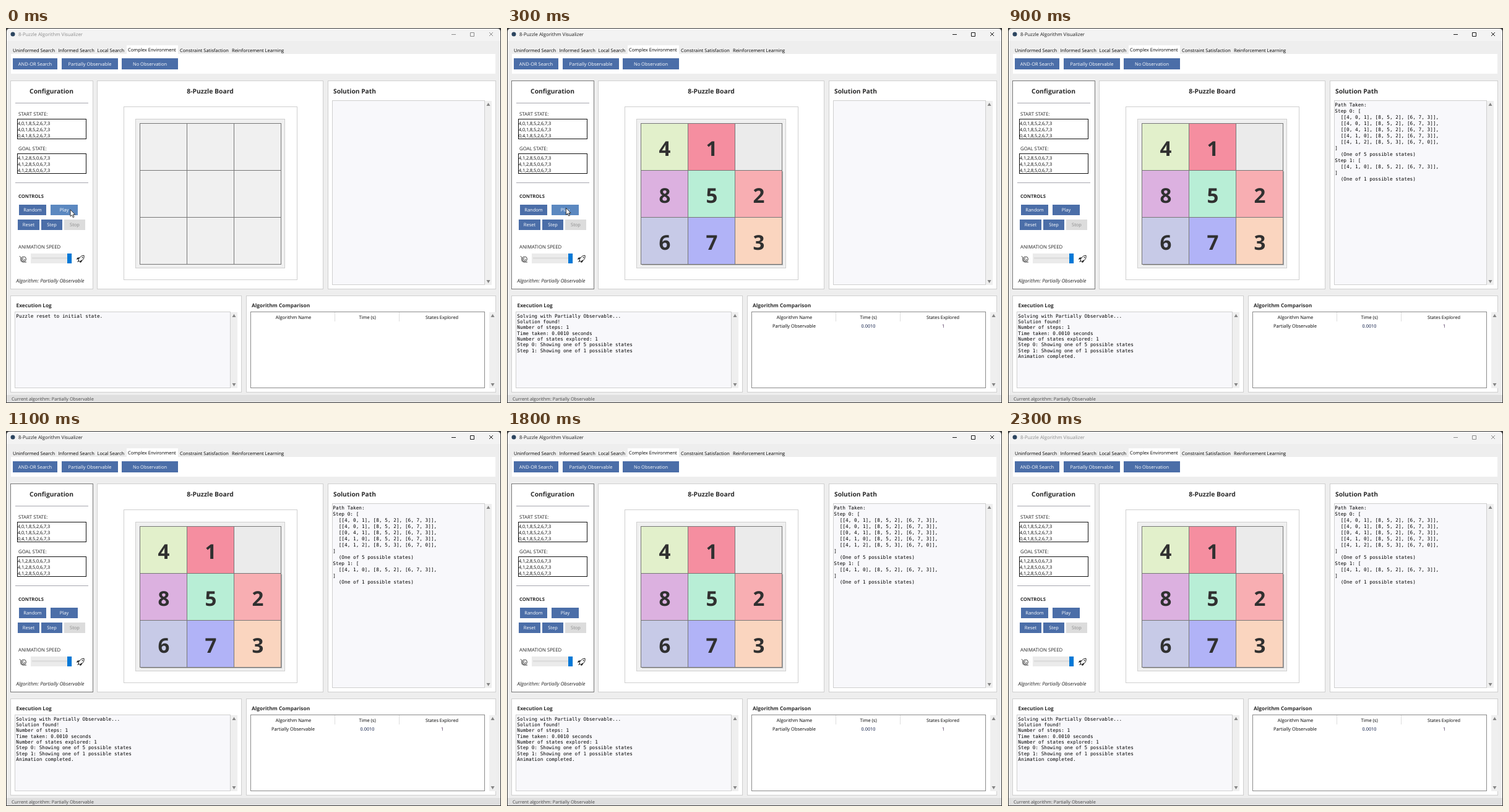
An HTML page with a canvas that plays this animation: 800x607 px, repeating every 2400 ms.

```html
<!DOCTYPE html>
<html lang="en">
<head>
<meta charset="utf-8">
<title>8-Puzzle Algorithm Visualizer</title>
<style>
html, body { margin: 0; width: 100%; height: 100%; overflow: hidden; background: #fff; }
canvas { display: block; }
</style>
</head>
<body>
<canvas id="stage" width="800" height="607"></canvas>
<script>
const c = document.getElementById('stage').getContext('2d');
c.textRendering = 'geometricPrecision';
const LOOP = 2400, BLUE = '#4b6ea8', HOVER = '#5b88c0', EDGE = '#cfcfcf', PAPER = '#f8f8fb';
const SANS = '"Open Sans", sans-serif', MONO = '"DejaVu Sans Mono", monospace';
const TILES = ['#ebebeb', '#f58ea0', '#f8aeb2', '#fad5bf', '#e2f0cb', '#b8eed6', '#c7cae7', '#b1b3f7', '#dcb1e0'];
const LOG = [
  'Solving with Partially Observable...',
  'Solution found!',
  'Number of steps: 1',
  'Time taken: 0.0010 seconds',
  'Number of states explored: 1',
  'Step 0: Showing one of 5 possible states',
  'Step 1: Showing one of 1 possible states',
  'Animation completed.'
];
const PATH = [
  'Path Taken:',
  'Step 0: [',
  '  [[4, 0, 1], [8, 5, 2], [6, 7, 3]],',
  '  [[4, 0, 1], [8, 5, 2], [6, 7, 3]],',
  '  [[0, 4, 1], [8, 5, 2], [6, 7, 3]],',
  '  [[4, 1, 0], [8, 5, 2], [6, 7, 3]],',
  '  [[4, 1, 2], [8, 5, 3], [6, 7, 0]],',
  ']',
  '  (One of 5 possible states)',
  'Step 1: [',
  '  [[4, 1, 0], [8, 5, 2], [6, 7, 3]],',
  ']',
  '  (One of 1 possible states)'
];

function fill(x, y, x2, y2, color) {
  c.fillStyle = color;
  c.fillRect(x, y, x2 - x, y2 - y);
}

// Filled box with a one-pixel border inside its corners
function box(x, y, x2, y2, color, edge) {
  fill(x, y, x2, y2, color);
  c.lineWidth = 1;
  c.strokeStyle = edge;
  c.strokeRect(x + .5, y + .5, x2 - x - 1, y2 - y - 1);
}

// y is the middle of the capitals
function text(s, x, y, size, { color = '#111', style = '', align = 'left', font = SANS } = {}) {
  c.font = `${style} ${size}px ${font}`;
  c.textAlign = align;
  c.fillStyle = color;
  c.fillText(s, x, y + size * .36);
}

const bold = (s, x, y, size, align) => text(s, x, y, size, { style: 'bold', align, color: '#2b2b2b' });
const mid = (s, x, y, size = 7.5, color = '#000') => text(s, x, y, size, { align: 'center', color });
const lines = (list, x, y, step, size, font) =>
  list.forEach((s, i) => text(s, x, y + i * step, size, { font, color: '#000' }));

function button(s, x, y, x2, y2, color = BLUE, ink = '#fff') {
  fill(x, y, x2, y2, color);
  mid(s, (x + x2) / 2, (y + y2) / 2, 7.5, ink);
}

function shape(d, color, edge, width = 1) {
  const p = new Path2D(d);
  if (color) { c.fillStyle = color; c.fill(p); }
  if (edge) { c.strokeStyle = edge; c.lineWidth = width; c.stroke(p); }
}

function scrollbar(x, y, y2) {
  fill(x, y, x + 11, y2, '#efefef');
  shape(`M${x + 2.5} ${y + 8}h6l-3-5z M${x + 2.5} ${y2 - 8}h6l-3 5z`, '#858585');
}

function titleBar(active) {
  const ink = active ? '#1a1a1a' : '#8c8c8c';
  fill(0, 0, 800, 21, '#f3f3f3');
  c.beginPath();
  c.arc(11, 10, 3.5, 0, 7);
  c.fillStyle = '#2c4560';
  c.fill();
  text('8-Puzzle Algorithm Visualizer', 20, 10.5, 7.75, { color: ink });
  shape('M720 10.5h7 M750.5 7.5h6v6h-6z M781 7l6 6m0-6l-6 6', null, ink, 1);
}

function tabs() {
  fill(8, 42, 791, 74, '#fff');
  fill(195, 28, 278, 43, '#fff');
  [['Uninformed Search', 11], ['Informed Search', 84.5], ['Local Search', 147.5], ['Complex Environment', 197],
   ['Constraint Satisfaction', 281], ['Reinforcement Learning', 365]]
    .forEach(([s, x], i) => text(s, x, i == 3 ? 35.5 : 36.5, 7.52, { color: '#000' }));
  button('AND-OR Search', 11, 49, 83, 67);
  button('Partially Observable', 90, 49, 181, 67);
  button('No Observation', 187, 49, 278, 67);
}

function config(active, hover) {
  box(7, 85, 141, 423, '#fff', active ? '#777' : EDGE);
  bold('Configuration', 73.5, 102.5, 10.3, 'center');
  fill(15, 121, 133, 122, '#a6a6ae');
  fill(15, 250, 133, 251, '#a6a6ae');
  text('START STATE:', 20, 139, 7.8, { color: '#222' });
  text('GOAL STATE:', 20, 195, 7.8, { color: '#222' });
  box(18, 147, 130, 180, '#fff', '#111');
  box(18, 203, 130, 236, '#fff', '#111');
  lines(['4,0,1,8,5,2,6,7,3', '4,0,1,8,5,2,6,7,3', '0,4,1,8,5,2,6,7,3'], 19, 154, 10, 7.35, SANS);
  lines(Array(3).fill('4,1,2,8,5,0,6,7,3'), 19, 210, 10, 7.35, SANS);
  bold('CONTROLS', 20, 272, 7.6);
  button('Random', 21, 286, 65, 303);
  button('Play', 72, 286, 116, 303, hover ? HOVER : BLUE);
  button('Reset', 19, 310, 54, 327);
  button('Step', 57, 310, 91, 327);
  button('Stop', 94, 310, 128, 327, '#dcdcdc', '#8c8c8c');
  text('ANIMATION SPEED', 20, 354, 7.8, { color: '#222' });
  fill(40, 365, 107, 381, '#ebebeb');
  fill(42, 371, 105, 374, '#dedede');
  fill(99, 365, 106, 381, '#0078d7');
  // Snail and rocket
  shape('M22 369l2 3v5q1 2 4 2h5M32.5 374a4 4 0 1 1-8 0a4 4 0 1 1 8 0M30.5 374a2 2 0 1 1-2-2', null, '#333', .9);
  shape('M126 368q-5 0-8 5l-1 3 2 2 3-1q5-3 4-9z', '#fff', '#222');
  shape('M119 371l-4 1-1 3 3-1zM123 375l-1 4-3 1 1-3zM117 376l-2 3 3-1zM123.5 370.5a1 1 0 1 1-1 1z', '#222');
  text('Algorithm: Partially Observable', 16.5, 409, 8.05, { style: 'italic', color: '#222' });
}

function board(cells) {
  box(147, 85, 513, 423, '#fff', EDGE);
  bold('8-Puzzle Board', 330, 102.5, 10.4, 'center');
  box(190, 127, 471, 408, '#fff', EDGE);
  box(209, 147, 451, 389, '#f0f0f0', EDGE);
  for (let i = 0; i < 9; i++) {
    const x = 216 + i % 3 * 76, y = 154 + Math.floor(i / 3) * 76, n = cells ? +cells[i] : 0;
    if (n) fill(x + 2, y + 2, x + 78, y + 78, '#aaa');
    box(x, y, x + 77, y + 77, cells ? TILES[n] : '#f0f0f0', '#777');
    if (n) text(n, x + 39, y + 41, 33, { style: 'bold', align: 'center', color: '#303030' });
  }
}

function results(solved, logLines, pathLines) {
  box(520, 85, 792, 423, '#fff', EDGE);
  bold('Solution Path', 529, 102.5, 10.25);
  box(527, 117, 774, 416, PAPER, EDGE);
  scrollbar(774, 118, 416);
  lines(pathLines, 528.3, 124, 10, 7.75, MONO);

  box(7, 433, 381, 590, '#fff', EDGE);
  bold('Execution Log', 16.5, 449, 8.3);
  box(14, 459, 363, 583, PAPER, EDGE);
  scrollbar(363, 460, 583);
  lines(logLines, 16.3, 466, 9.33, 7.75, MONO);

  box(388, 433, 792, 590, '#fff', EDGE);
  bold('Algorithm Comparison', 397, 449, 8.35);
  box(395, 459, 774, 583, '#fff', '#8a8a8a');
  scrollbar(781, 460, 583);
  fill(531, 460, 532, 475, '#dedede');
  fill(635, 460, 636, 475, '#dedede');
  mid('Algorithm Name', 464.5, 468);
  mid('Time (s)', 584, 468);
  mid('States Explored', 704.5, 468, 7.35);
  if (solved) {
    mid('Partially Observable', 464, 482.5);
    mid('0.0010', 584, 482.5, 7.3, '#00103c');
    mid('1', 705, 482.5, 7.3, '#301040');
  }
}

function draw(now) {
  const t = Math.floor(now % LOOP / 100) * 100;
  const active = t >= 100 && t < 2200, solved = t >= 100, moved = t >= 300, done = t >= 400;
  const log = solved ? LOG.slice(0, done ? 8 : moved ? 7 : 6) : ['Puzzle reset to initial state.'];

  fill(0, 0, 800, 607, '#eee');
  titleBar(active);
  tabs();
  config(active, t < 400);
  board(solved && (moved ? '410852673' : '401852673'));
  results(solved, log, done ? PATH : []);
  fill(0, 594, 800, 607, '#dfdfdf');
  text('Current algorithm: Partially Observable', 9, 600.5, 7.3, { color: '#444' });
  fill(0, 606, 800, 607, '#4a4a4a');
  c.fillStyle = '#3c3c3c';
  c.fill(new Path2D('M0 0H800V607H0z M1 6V606H799V6q0-5-5-5H6q-5 0-5 5z'), 'evenodd');

  if (t < 600) {
    const u = Math.max(0, (t - 200) / 300) ** 2;
    shape(`M${104 - 77 * u} ${294 - 23 * u}v11l2.5-2.3 1.8 4 1.8-.8-1.8-3.9h3.3z`, '#fff', '#222', .9);
  }
}

function tick() {
  draw(performance.now());
  requestAnimationFrame(tick);
}
tick();
</script>
</body>
</html>
```
